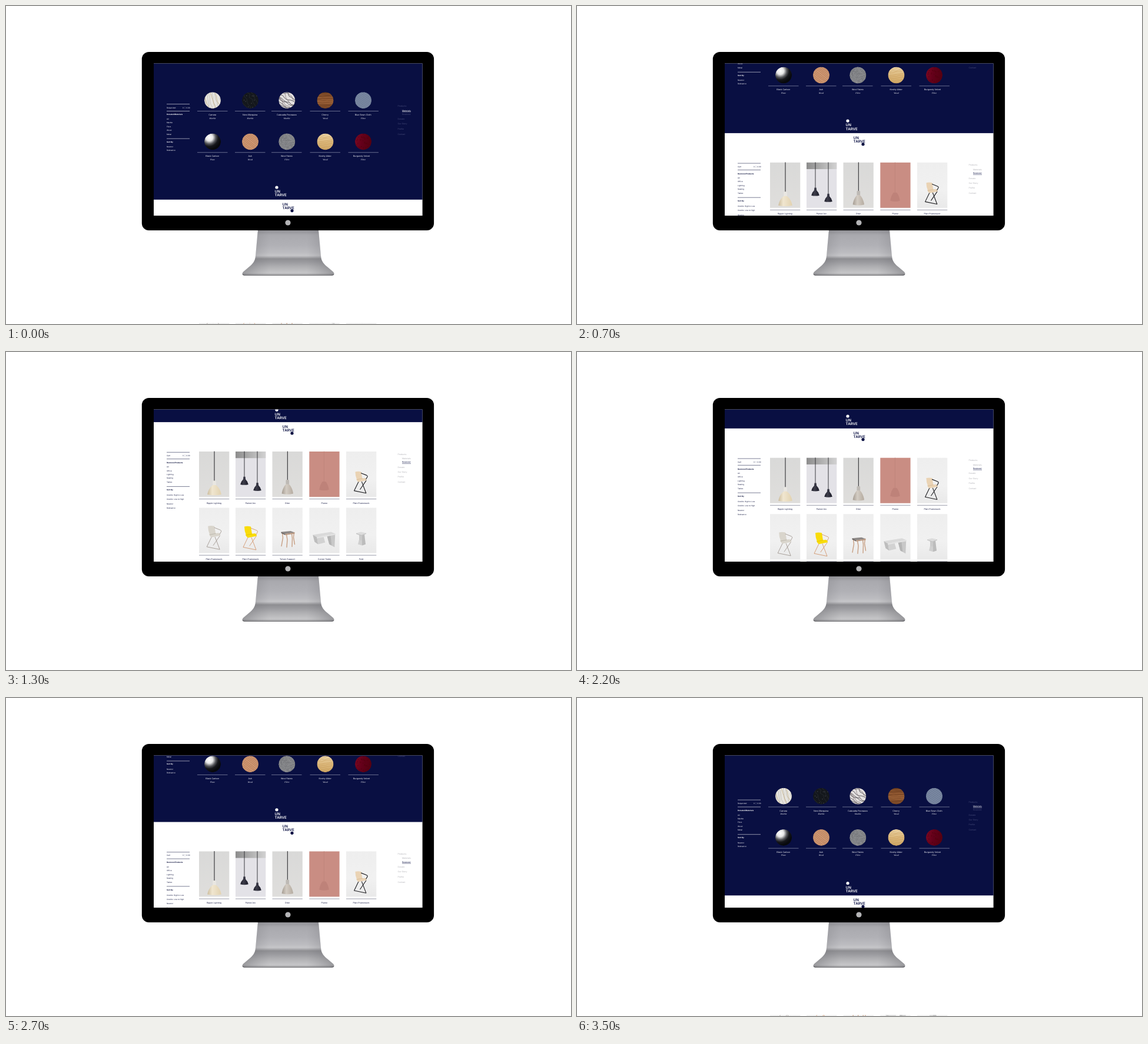
Write an HTML page that moves like this. It is 960 px wide and 540 px high and loops after 5.1 s.

```html
<!DOCTYPE html>
<html lang="en">
<head>
<meta charset="utf-8">
<title>Material shop on a desktop display</title>
<style>
html, body { margin: 0; width: 100%; height: 100%; overflow: hidden; background: #fff; }
svg { display: block; width: 960px; height: 540px; }
text { font-family: Inter, sans-serif; text-rendering: geometricPrecision; }
.it { font-family: "Liberation Serif", serif; font-style: italic; }
</style>
</head>
<body>
<svg id="stage" viewBox="0 0 960 540" xmlns="http://www.w3.org/2000/svg"></svg>
<script>
const NAVY = '#090f42', DIM = '#484d7a', PALE = '#b0b0b6';
const LOOP = 5100, STEP = 100, WHITE_TOP = 209.7;

let seed = 7;
const rnd = () => (seed = (seed * 16807) % 2147483647) / 2147483647;
const spread = a => (rnd() - 0.5) * 2 * a;

// ---------- drawing helpers ----------
const text = (x, y, s, fill, size = 3.6, extra = '') =>
  `<text x="${x}" y="${y + size * 0.36}" font-size="${size}" fill="${fill}" ${extra}>${s}</text>`;
const mid = 'text-anchor="middle"';
const bold = 'font-weight="700"';
const rect = (x, y, w, h, fill, extra = '') =>
  `<rect x="${x}" y="${y}" width="${w}" height="${h}" fill="${fill}" ${extra}/>`;
const rule = (x, y, w, color, width = 0.6) =>
  `<path d="M${x} ${y}h${w}" stroke="${color}" stroke-width="${width}"/>`;
const shape = (d, fill) => `<path d="${d}" fill="${fill}"/>`;
const line = (d, color, w) =>
  `<path d="${d}" fill="none" stroke="${color}" stroke-width="${w}" stroke-linejoin="round" stroke-linecap="round"/>`;
const dot = (x, y, r, fill) => `<circle cx="${x}" cy="${y}" r="${r}" fill="${fill}"/>`;
const gradient = (id, dir, stops) => `<linearGradient id="${id}" ${dir}>` +
  stops.map(([o, c]) => `<stop offset="${o}" stop-color="${c}"/>`).join('') + '</linearGradient>';
const down = 'x1="0" y1="0" x2="0" y2="1"';

// Wobbly parallel strands across a swatch of radius 14
function veins(n, angle, color, w, jitter) {
  let d = '';
  for (let i = 0; i < n; i++) {
    const y = -14 + 28 * (i + 0.5) / n + spread(jitter);
    for (let x = -15; x <= 15; x += 5) {
      d += `${x < -14 ? 'M' : 'L'}${x} ${(y + spread(jitter)).toFixed(2)}`;
    }
  }
  return `<g transform="rotate(${angle})">${line(d, color, w)}</g>`;
}

function specks(n, color, size) {
  let d = '';
  for (let i = 0; i < n; i++) d += `M${spread(14).toFixed(1)} ${spread(14).toFixed(1)}h${size}`;
  return line(d, color, size);
}

// ---------- materials ----------
const swatches = [
  ['Carrara', 'Marble', '#e6e4df', () => veins(6, 78, '#aaa69c', 0.5, 1.4) + veins(3, 70, '#b99c62', 0.5, 1.5)],
  ['Nero Marquina', 'Marble', '#14171c', () => veins(4, 65, '#3c4047', 0.35, 2.4) + specks(14, '#8a8d92', 0.5)],
  ['Calacatta Peonazzo', 'Marble', '#e4e1e0', () => veins(7, 28, '#3a383e', 0.7, 2.4) + veins(4, 50, '#87797a', 0.7, 2.2)],
  ['Cherry', 'Wood', 'url(#cherry)', () => veins(9, 2, '#5c3016', 0.6, 0.5) + veins(5, -2, '#b07446', 0.5, 0.7)],
  ['Blue Sewn Cloth', 'Fibre', '#76849d', () => veins(10, 35, '#5f6e8c', 0.5, 0.1) + veins(10, -35, '#8794ab', 0.5, 0.1)],
  ['Black Carbon', 'Plate', 'url(#carbon)', () => ''],
  ['Ash', 'Wood', '#cf9873', () => veins(11, 38, '#a86f4d', 0.6, 0.3)],
  ['Wool Fabric', 'Fibre', '#838487', () => specks(150, '#6e6f73', 0.7) + specks(110, '#9b9c9f', 0.6)],
  ['Knotty Alder', 'Wood', 'url(#alder)', () => veins(8, -8, '#c39553', 0.45, 0.8)],
  ['Burgundy Velvet', 'Fibre', 'url(#velvet)', () => specks(60, '#54000f', 0.9)]
];
const swatchX = [351, 415, 477.3, 542.5, 607];
const ruleX = [325, 389, 451, 516.5, 581.5];

function swatch([name, kind, fill, grain], i) {
  const c = i % 5, y = i < 5 ? 160.2 : 230.4;
  const x = i === 9 ? 604 : swatchX[c] - 0.3;
  return `<g transform="translate(${swatchX[c]} ${y})" clip-path="url(#disc)">${dot(0, 0, 14, fill)}${grain()}</g>` +
    rule(ruleX[c], y + 18.3, 51.5, '#a5a8c0') +
    text(x, y + 24.6, name, '#fff', 3.6, mid) +
    text(swatchX[c], y + 30.2, kind, '#fff', 3.7, mid + ' class="it"');
}

// ---------- side columns ----------
function sidebar(color, lines, basket, rows) {
  return lines.map(y => rule(273, y, 39, color, 0.55)).join('') +
    text(312.8, basket, '0 &#160;|&#160; 0.00', color, 3.05, 'text-anchor="end"') +
    rows.map(([y, s, b]) => text(273, y, s, color, 3.05, b ? bold : '')).join('');
}

function menu(y, active, on, off) {
  const subs = [['Materials', 7.5], ['Restored', 13.8]];
  const rows = [['Products', 0], ['Donate', 22.2], ['Our Story', 30.4], ['Profile', 38.9], ['Contact', 47.6]];
  return rows.map(([s, d]) => text(665.5, y + d, s, off, 3.5)).join('') +
    subs.map(([s, d], i) => text(673, y + d, s, i === active ? on : off, 3.45)).join('') +
    rule(673, y + subs[active][1] + 2.4, 15, on, 0.5);
}

const mark = (x, y, fill) =>
  text(x, y, 'UN', fill, 6.2, 'font-weight="600"') + text(x, y + 6.2, 'TARVE', fill, 6.2, 'font-weight="600"');

// ---------- products, drawn relative to their card ----------
const bell = (x, y, w, h, fill) => shape(
  `M${x - 2.6} ${y}H${x + 2.6}C${x + w * 0.6} ${y + h * 0.18} ${x + w * 0.9} ${y + h * 0.55} ${x + w} ${y + h}` +
  `Q${x} ${y + h + 2.4} ${x - w} ${y + h}C${x - w * 0.9} ${y + h * 0.55} ${x - w * 0.6} ${y + h * 0.18} ${x - 2.6} ${y}Z`, fill);
const cone = (x, y) => shape(
  `M${x - 1.6} ${y}h3.2l0.5 4.5q3.6 3.4 4.7 8.6q-6.8 1.8 -13.600 0q1.100 -5.200 4.700 -8.600z`, 'url(#cone)');
const cord = (x, y, color = '#1c1c20', w = 1) => line(`M${x} 0V${y}`, color, w);

const chair = (x, y, k, fill, shade, frame, w) => `<g transform="translate(${x} ${y}) scale(${k})">` +
  line('M7 20L-1 36.5L21 41L13 20M21 18L10 34', frame, w) +
  shape('M1 1.500Q6 0 12 1.500L14 14L4 16Q1 9 1 1.500Z', fill) +
  shape('M3 15L19 13Q22 14 22 17.500L7 20.500Q4 19 3 15Z', fill) +
  line('M4 16L14 14', shade, 0.6) +
  line('M12 4L22 8Q24 9 23.500 10.500L21 15', frame, w) + '</g>';

const stool = () => line('M17 43L18 51L15.500 65M24 45L25.500 54L24.500 67M33 44L34 52L33.500 66M37 42L36 50L38 62', '#c79f83', 1.4) +
  shape('M15 41L31 39.500L38 42L22 44.500Z', '#8d8886') + shape('M15 41L22 44.500V46.500L15 43Z', '#66605f') +
  shape('M22 44.500L38 42V44L22 46.500Z', '#b9977f');

const bench = () => shape('M6 46L37 41L44 44L13 50Z', '#dadada') + shape('M6 46L13 50L15 62L9 58Z', '#bdbdbd') +
  shape('M13 50L24 48L27 59L15 62Z', '#d2d2d2') + shape('M30 47L44 44L43 67L34 62Z', '#c8c8c8') +
  shape('M30 47L36 46L38 64L34 62Z', '#b4b4b4') + shape('M13 50L44 44V46L13 52Z', '#e4e4e4');

const triad = () => shape('M22 54L31 54L33 62L27 64L20 62Z', '#d0d0d0') + shape('M22 45L31 45L31 55L22 55Z', '#cacaca') +
  shape('M27 46L31 45L33 62L27 64Z', '#bcbcbc') + shape('M17 43L25 41L34 43L26 46.5Z', '#dcdcdc') +
  shape('M17 43L26 46.5L34 43V44.2L26 48L17 44.4Z', '#c4c4c4');

const cards = [
  ['Ripple Lighting', 'url(#wall)', () => cord(26, 50) + rect(23.2, 49.5, 5.6, 9, '#e9e7e2', 'rx="1.5"') +
    bell(26, 57, 11.8, 16, 'url(#cream)')],
  ['Paired Arc', '#e3e2e7', () => rect(0, 0, 51.3, 11.2, 'url(#band)') + cord(15, 43, '#26262c', 0.9) +
    cord(37, 53, '#26262c', 0.9) + cone(15, 42.8) + cone(37, 53)],
  ['Otter', 'url(#wall)', () => cord(25.8, 49) + rect(23, 48, 5.6, 8, '#bdb9b4', 'rx="1.5"') +
    bell(25.8, 55.5, 9.7, 16, 'url(#stone)')],
  ['Plume', '#c98d83', () => cord(25.2, 51, '#bd8178', 0.6) + bell(25.2, 51, 8.2, 14, '#be8279')],
  ['Plain Framework', 'url(#bright)', () => chair(14.5, 33, 0.92, '#ead3b4', '#c9ab85', '#1d1d20', 1.2)],
  ['Plain Framework', 'url(#bright)', () => chair(14.2, 29.8, 1, '#d9d5cc', '#aaa598', '#8b8078', 0.7)],
  ['Plain Framework', 'url(#bright)', () => chair(14, 30.5, 1, '#f9dc0a', '#d8b800', '#cf8d60', 0.8)],
  ['Tolven Support', 'url(#bright)', stool],
  ['Corner Table', 'url(#bright)', bench],
  ['Fold', 'url(#bright)', triad]
];
const cardX = [328, 390, 452.5, 515.3, 578];

function card([name, fill, art], i) {
  const x = cardX[i % 5], y = i < 5 ? 169 : 264.5;
  return `<g transform="translate(${x} ${y})">${rect(0, 0, 51.3, 77, fill)}${art()}` +
    rule(0, 80.6, 51.3, '#55586f', 0.6) + text(25.5, 87.3, name, '#1a1e48', 3.6, mid) + '</g>';
}

// ---------- page ----------
const bluePart = () => rect(240, -200, 480, 528.8, NAVY) +
  sidebar('#fff', [166.6, 178.5, 225.2], 172.6, [
    [172.6, 'Requested'], [184.4, 'Donated Materials', 1], [192, 'All'], [198.3, 'Marble'], [204.7, 'Fibre'],
    [211, 'Wood'], [217.7, 'Metal'], [230.6, 'Sort By', 1], [239, 'Newest'], [245.2, 'Relevance']]) +
  menu(169.8, 0, '#fff', DIM) + swatches.map(swatch).join('') +
  dot(460, 308, 2.6, '#fff') + mark(456.6, 315, '#fff');

const whitePart = () => `<g transform="translate(0 ${WHITE_TOP})">` +
  sidebar('#10153f', [170.3, 181.6, 228.4], 175.9, [
    [175.9, 'Cart'], [187.8, 'Restored Products', 1], [195.2, 'All'], [201.6, 'Office'], [208, 'Lighting'],
    [214.3, 'Seating'], [221.3, 'Tables'], [234.4, 'Sort By', 1], [243.2, 'Credits: High to Low'],
    [250.4, 'Credits: Low to High'], [257.8, 'Newest'], [265, 'Relevance']]) +
  menu(173.3, 1, NAVY, PALE) + cards.map(card).join('') + '</g>' +
  mark(469.6, 336.3, NAVY) + dot(486, 347.6, 2.6, NAVY);

const defs = '<defs>' +
  gradient('metal', down, [[0, '#8f8f94'], [0.12, '#a9a9ae'], [0.35, '#b1b1b6'], [0.5, '#bcbcc0'], [0.57, '#c6c6c9'],
    [0.64, '#8e8e92'], [0.7, '#98989c'], [0.82, '#b0b0b3'], [0.95, '#c6c6c8'], [1, '#a0a0a3']]) +
  gradient('sheen', '', [[0, '#55555a66'], [0.3, '#77777b00'], [0.7, '#77777b00'], [1, '#55555a66']]) +
  gradient('cherry', down, [[0, '#6f3f20'], [0.35, '#8f5730'], [0.65, '#9a6138'], [1, '#6a3b1e']]) +
  gradient('alder', down, [[0, '#ecd6aa'], [0.5, '#dcb87c'], [1, '#cfa766']]) +
  gradient('velvet', 'x1="0" y1="0" x2="1" y2="0.2"', [[0, '#7d0822'], [0.5, '#64001a'], [1, '#570012']]) +
  gradient('wall', down, [[0, '#d9d9d8'], [1, '#dfdedc']]) +
  gradient('bright', down, [[0, '#eeeeee'], [0.6, '#f1f1f1'], [1, '#e9e9e9']]) +
  gradient('band', '', [[0, '#8c8c8c'], [0.5, '#b0b0b0'], [1, '#d2d2d2']]) +
  gradient('cream', '', [[0, '#cdbd9d'], [0.35, '#f0e6d0'], [1, '#e2d2b0']]) +
  gradient('stone', '', [[0, '#a59c92'], [0.4, '#d3ccc3'], [1, '#b5aba0']]) +
  gradient('cone', '', [[0, '#1b1b27'], [0.4, '#3d3d4a'], [1, '#191926']]) +
  '<radialGradient id="carbon" cx="0.3" cy="0.24" r="0.72"><stop offset="0" stop-color="#fff"/>' +
  '<stop offset="0.3" stop-color="#e6e6e6"/><stop offset="0.55" stop-color="#55565a"/>' +
  '<stop offset="0.75" stop-color="#15161a"/><stop offset="1" stop-color="#08090c"/></radialGradient>' +
  '<clipPath id="disc"><circle r="14"/></clipPath>' +
  '<clipPath id="view"><rect x="251" y="97.5" width="456.6" height="258.6"/>' +
  '<rect x="251" y="538.6" width="456.6" height="1.4"/></clipPath></defs>';

const foot = 'M428 380H531L535 424C535.500 434 541 439 546 443L556 451.500Q559 455 556 457H403Q400 455 403 451.500' +
  'L413 443C418 439 423.500 434 424 424Z';
const display = shape(foot, 'url(#metal)') + shape(foot, 'url(#sheen)') +
  line('M402.500 456.200Q404 457.300 408 457.300H551Q555 457.300 556.500 456.200', '#626266', 1.1) +
  rect(230.8, 77.9, 496.3, 303, '#000', 'rx="12"') +
  dot(479, 368, 4.6, '#b4b4b6');

const stage = document.getElementById('stage');
stage.innerHTML = defs + rect(0, 0, 960, 540, '#fff') + display +
  `<g clip-path="url(#view)"><g id="page">${rect(240, -200, 480, 1000, '#fff')}${whitePart()}${bluePart()}</g></g>`;
const page = document.getElementById('page');

// ---------- motion: steady scroll down, rest, scroll back up, rest ----------
function scrollAt(t) {
  const k = Math.floor(t / STEP);
  if (k <= 13) return 16.13 * k;
  if (k < 22) return WHITE_TOP;
  if (k < 35) return 199 - 16.15 * (k - 22);
  return -6.5;
}

const start = performance.now();
function draw() {
  const t = (performance.now() - start) % LOOP;
  page.setAttribute('transform', `translate(0 ${(-scrollAt(t)).toFixed(2)})`);
  requestAnimationFrame(draw);
}
draw();
</script>
</body>
</html>
```
